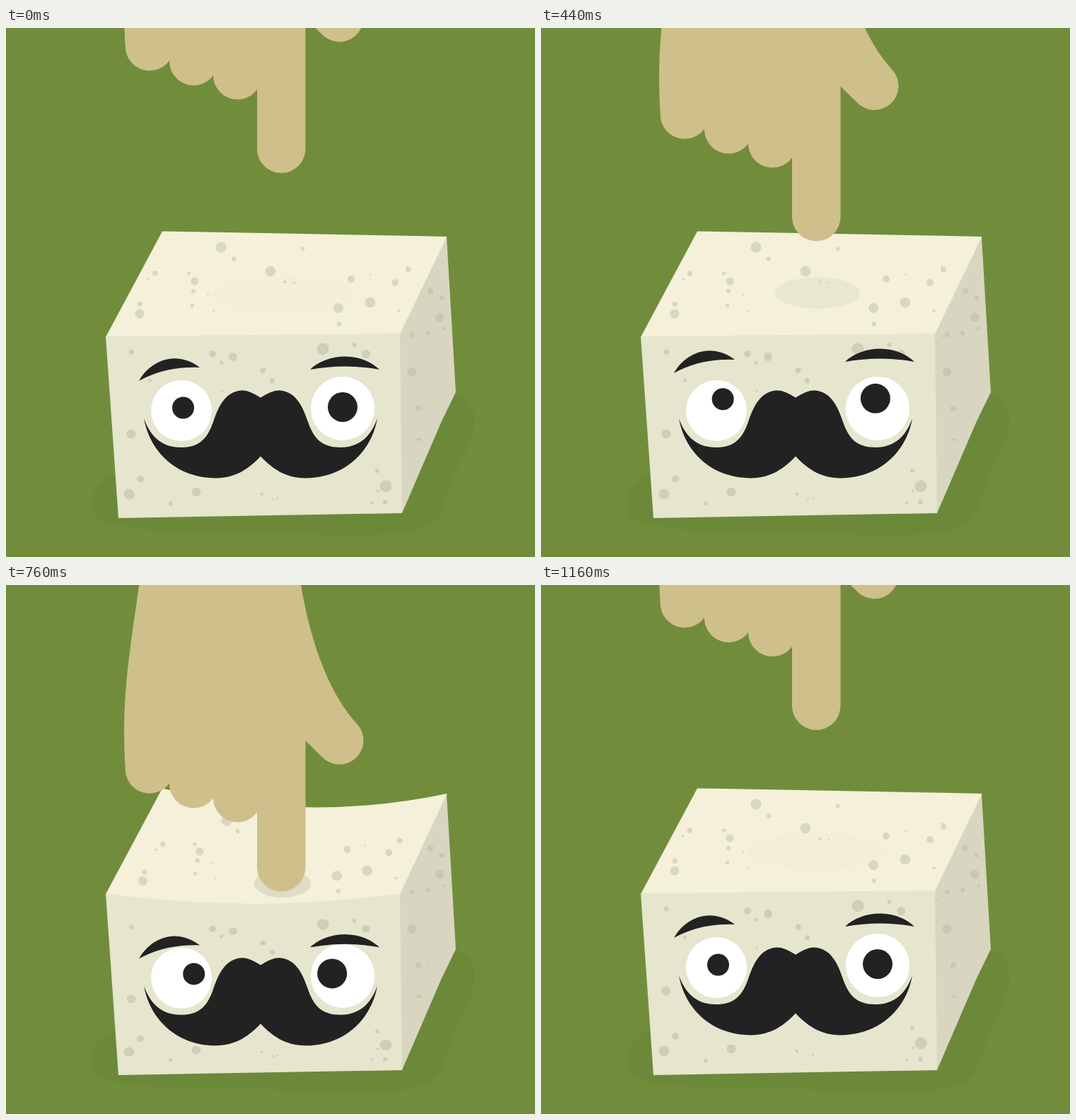
Animation, 748 px wide and 748 px high, one loop 1.66 s. Source, as an HTML page:

```html
<!DOCTYPE html>
<html lang="en">
<head>
<meta charset="utf-8">
<title>Poke</title>
<style>
html, body { margin: 0; height: 100%; overflow: hidden; background: #718d3b; }
svg { display: block; width: 100%; height: 100%; }
</style>
</head>
<body>
<svg viewBox="0 0 748 748">
  <path fill="#6c893a" d="M150 632C130 638 119 660 122 682C126 702 160 703 195 708C250 717 300 710 350 712C420 715 470 719 520 717C570 715 602 708 614 688C626 666 626 650 635 630C646 606 658 590 662 562C665 540 655 517 630 514L300 560Z"/>
  <path fill="#d8d6c0" d="M623 295L636 515L616 556L560 686L550 560L557 432Z"/>
  <g id="sideSpots" fill="#cac8b3"></g>
  <path id="top" fill="#f4f0d9"/>
  <ellipse id="dent" cx="391"/>
  <g id="topSpots" fill="#d9d7c2"></g>
  <path id="front" fill="#e6e5ce"/>
  <g id="frontSpots" fill="#d0ceb8"></g>
  <g id="face" fill="#222">
    <circle cx="248" cy="541" r="43" fill="#fff"/>
    <circle cx="476" cy="538" r="45" fill="#fff"/>
    <path id="half" d="M360.5 523C348 515 340 512 333 512.5C308 514 299 540 293 557C285 580 274 593 247 593C216 593 202 572 195 552C203 598 240 636.5 297 636.5C325 636.5 345 622 360.5 605Z"/>
    <use href="#half" transform="matrix(-1 0 0 1 720 0)"/>
  </g>
  <g fill="#222">
    <circle id="pupilL" r="15.5"/>
    <circle id="pupilR" r="21"/>
    <path id="brows" d="M188 499C202 473 238 453 274 480Q226 478 188 499ZM430 483C452 461 500 456 528 483Q480 474 430 483Z"/>
  </g>
  <g fill="#cfbf8b">
    <path id="fist" d="M192 -262L189 -240C175 -140 162 -70 169 30A34.3 34.3 0 0 0 231 46A34.3 34.3 0 0 0 293 67A34.3 34.3 0 0 0 355 87L423 60L423 -14.5L446 8A34 34 0 0 0 497 -37C459 -78 431 -148 416 -240L413 -262Z"/>
    <rect id="finger" x="355" y="-200" width="68.5" height="405" rx="34.2"/>
  </g>
</svg>
<script>
const $ = id => document.getElementById(id);
const set = (el, attrs) => { for (const k in attrs) el.setAttribute(k, attrs[k]); };

const STEP = 40, LOOP = 1660, LAST = 29, TOUCH = 14, PEAK = 18, LEAVE = 22;

let seed = 11;
const random = () => (seed = seed * 16807 % 2147483647) / 2147483647;
const mix = (a, b, t) => a + (b - a) * t;

// a few big spots per face, then small ones scattered inside its corners
function spots(id, corners, big, count, place = v => v) {
  const [a, b, c, d] = corners;
  const list = [...big];
  for (let i = 0; i < count; i++) {
    const u = mix(.04, .96, random()), v = mix(.06, .94, place(random()));
    const [x, y] = [0, 1].map(k => mix(mix(a[k], b[k], u), mix(d[k], c[k], u), v));
    list.push([x, y, 1.3 + 3 * random() ** 1.5]);
  }
  return list.map(([x, y, r]) => {
    const el = document.createElementNS("http://www.w3.org/2000/svg", "circle");
    set(el, { cx: x, cy: y, r });
    return { x, y, el: $(id).appendChild(el) };
  });
}

const A = [221, 288], B = [623, 295], C = [557, 432], D = [141, 436];
const E = [159, 693], F = [560, 686], G = [636, 515];
const topSpots = spots("topSpots", [A, B, C, D], [
  [304, 310, 7.5], [374, 344, 7.5], [470, 396, 7], [515, 388, 7.3],
  [189, 404, 6.5], [267, 358, 5.5], [488, 355, 5], [550, 360, 5]
], 18);
spots("frontSpots", [D, C, F, E], [
  [448, 454, 8.5], [537, 648, 8.5], [174, 659, 7.5], [177, 574, 6.5], [269, 656, 6.5],
  [321, 465, 6], [509, 461, 6], [292, 461, 5], [190, 638, 5]
], 17, v => v < .5 ? v * .6 : .55 + v * .45);
spots("sideSpots", [C, B, G, F], [[613, 409, 6.5], [574, 486, 6.5], [600, 372, 4.5]], 9);

function pose(n) {
  const left = LAST - n;
  if (n <= TOUCH) return { hand: .797 * n * n, squash: 0, look: n / TOUCH };
  if (n >= LEAVE) return { hand: 59 * (left / 4) ** 1.74, squash: 0, look: left / (LAST - LEAVE) };
  const squash = Math.min((n - TOUCH) / 3, (LEAVE + .2 - n) / 3.1, 1.2);
  return { hand: 156 + 71 * squash ** (n < PEAK ? 1 : .57), squash, look: 1 };
}

function draw(n) {
  const { hand, squash: d, look } = pose(n);
  const soft = Math.sqrt(d);

  const backSag = 44 * Math.max(0, (d - .4) / .6);
  const frontSag = 434 + 31 * d ** .2;
  const corner = 432 + 4 * d;
  set($("top"), { d: `M221 287.5Q422 ${291 + backSag} 623.5 295L557 ${corner + 1}L350 470L141 437Z` });
  set($("front"), { d: `M141 436Q355 ${frontSag} 557 ${corner}L560 686L159 693Z` });
  set($("frontSpots"), { transform: `translate(0 ${.117 * d * 668}) scale(1 ${1 - .117 * d})` });

  for (const { x, y, el } of topSpots) set(el, {
    cx: x + d * (391 - x) * .0007 * (435 - y),
    cy: y + d * (14 + .09 * Math.max(0, 404 - y))
  });

  set($("dent"), {
    cy: 377 - 3 * look + 46.5 * d,
    rx: 101 - 52 * look - 9 * Math.min(1, soft),
    ry: 26 - 4.5 * look - 1.5 * d,
    "fill-opacity": .007 + .043 * look + .035 * soft
  });

  set($("face"), { transform: `translate(0 ${14.3 * d})` });
  set($("brows"), { transform: `translate(0 ${-14 * look + 42 * d})` });
  set($("pupilL"), { cx: 250.5 + 8.5 * look + 6.5 * d, cy: 537 - 15.5 * look + 27.5 * d });
  set($("pupilR"), { cx: 476 - 4 * look - 10.5 * d, cy: 536 - 15.5 * look + 28 * d });

  set($("fist"), { transform: `translate(0 ${hand + 5.8 * d})` });
  set($("finger"), { transform: `translate(0 ${hand})` });
}

const start = performance.now();
let shown = -1;
function tick(now) {
  const t = Math.max(0, now - start) % LOOP;
  const n = Math.min(LAST, Math.floor(t / STEP));
  if (n !== shown) draw(shown = n);
  requestAnimationFrame(tick);
}
tick(start);
</script>
</body>
</html>
```
